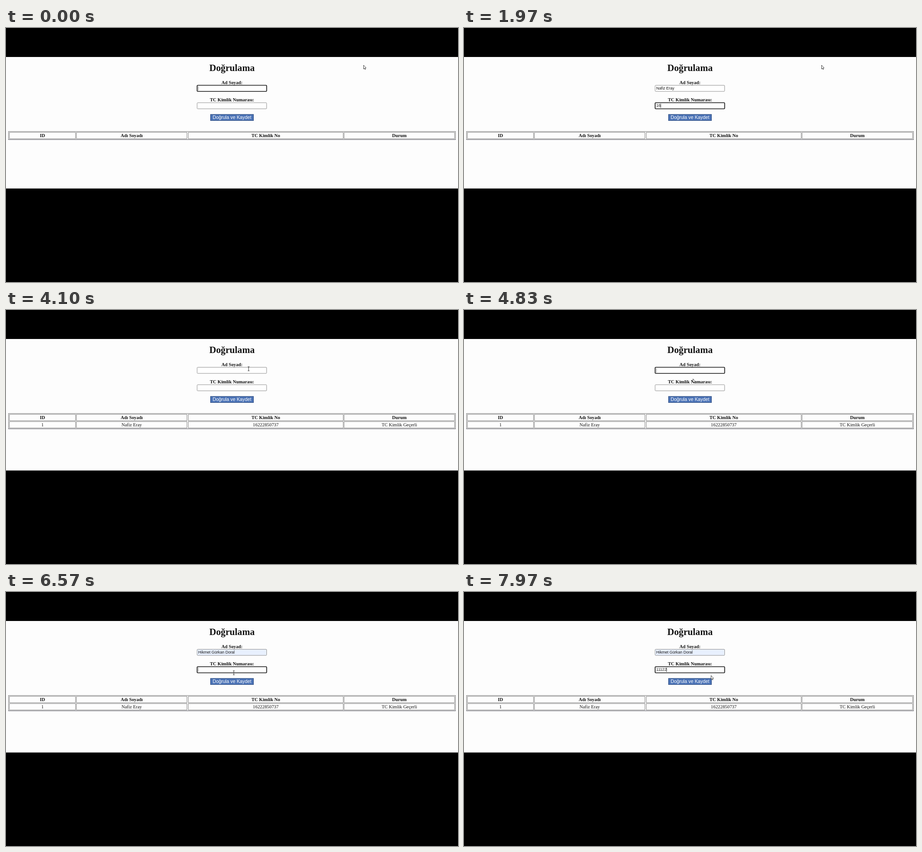
Animation of 998 by 561 pixels, one loop 8 s. Source, as an HTML page with a canvas:

```html
<!DOCTYPE html>
<html lang="tr">
<head>
<meta charset="utf-8">
<title>Doğrulama</title>
<style>
html, body { margin: 0; width: 100%; height: 100%; overflow: hidden; background: #000; }
canvas { display: block; }
</style>
</head>
<body>
<canvas id="stage" width="998" height="561"></canvas>
<script>
const ctx = document.getElementById('stage').getContext('2d');
const LOOP = 8000;
const SERIF = '"Liberation Serif", serif';
const SANS = '"Liberation Sans", sans-serif';
const FIELD = { x: 422, w: 154, h: 14 };
const NAME_Y = 126, ID_Y = 164.5;
const PERSON = { name: 'Nafiz Eray', id: '16222850737' };
const SECOND = { name: 'Hikmet Gürkan Doral', id: '11122' };

// Column edges of the table cells
const COLUMNS = [[7, 154], [155, 400], [402, 745], [746, 991]];
const HEAD = ['ID', 'Adı Soyadı', 'TC Kimlik No', 'Durum'];
const ROW = ['1', PERSON.name, PERSON.id, 'TC Kimlik Geçerli'];

const SUBMIT = 3000, CLICK_NAME = 4450, FILL = 5400, CLICK_ID = 6400;

// [time, value] and [time, x, y] keys
const NAME_KEYS = [[60, 0], [1450, 10]];
const ID_KEYS = [[1700, 0], [1930, 2], [2330, 8], [2630, 8], [2850, 11]];
const SECOND_KEYS = [[7360, 0], [7390, 1], [7900, 5]];
const POINTER = [
  [3500, 789.5, 82], [4270, 500, 136], [4550, 500, 136], [4800, 505.5, 152],
  [5170, 505.5, 152], [5600, 536, 163], [6030, 536, 163], [6380, 503, 178],
  [6830, 503, 178], [7070, 545.5, 184.5]
];

const linear = u => u;
const smooth = u => u * u * (3 - 2 * u);

function at(keys, t, ease = linear) {
  if (t <= keys[0][0]) return keys[0].slice(1);
  for (let i = 1; i < keys.length; i++) {
    const a = keys[i - 1], b = keys[i];
    if (t < b[0]) {
      const u = ease((t - a[0]) / (b[0] - a[0]));
      return a.slice(1).map((v, j) => v + (b[j + 1] - v) * u);
    }
  }
  return keys[keys.length - 1].slice(1);
}

const typed = (text, keys, t) => text.slice(0, Math.floor(at(keys, t)[0]));

function label(text, x, y, font, color = '#111', align = 'center') {
  ctx.font = font;
  ctx.fillStyle = color;
  ctx.textAlign = align;
  ctx.fillText(text, x, y);
}

function field(y, text, focused, caret, filled) {
  const { x, w, h } = FIELD;
  ctx.beginPath();
  ctx.roundRect(x, y + 0.5, w - 0.5, h - 0.5, 1.5);
  ctx.fillStyle = filled ? '#e8f0fe' : '#fff';
  ctx.fill();
  ctx.lineWidth = focused ? 1.7 : 0.9;
  ctx.strokeStyle = focused ? '#161616' : '#858585';
  ctx.stroke();
  label(text, 424.5, y + 9.7, '8.63px ' + SANS, '#161616', 'left');
  if (focused && caret) {
    ctx.fillStyle = text ? '#222' : '#777';
    ctx.fillRect(424.4 + ctx.measureText(text).width, y + 2.5, 0.9, 9.5);
  }
}

function cells(texts, y, font) {
  ctx.strokeStyle = '#858585';
  ctx.lineWidth = 1;
  COLUMNS.forEach(([l, r], i) => {
    ctx.strokeRect(l + 0.5, y + 0.5, r - l - 1, 14);
    label(texts[i], (l + r) / 2, y + 11.2, font);
  });
}

function table(hasRow) {
  const bottom = hasRow ? 262 : 246;
  ctx.lineWidth = 1;
  ctx.strokeStyle = '#808080';
  ctx.strokeRect(5.5, 228.5, 987, bottom - 228);
  ctx.fillStyle = '#55555f';
  ctx.fillRect(5, bottom, 988, 1);
  cells(HEAD, 230, 'bold 10.35px ' + SERIF);
  if (hasRow) cells(ROW, 246, '10.35px ' + SERIF);
}

function arrow(x, y) {
  ctx.beginPath();
  [[0, 0], [0, 8.6], [1.9, 6.9], [3.2, 9.7], [4.4, 9.1], [3.2, 6.4], [5.7, 6.2]]
    .forEach(([dx, dy]) => ctx.lineTo(x + dx, y + dy));
  ctx.closePath();
  ctx.fillStyle = '#fff';
  ctx.fill();
  ctx.lineWidth = 0.9;
  ctx.strokeStyle = '#333';
  ctx.stroke();
}

function beam(x, y) {
  ctx.fillStyle = '#333';
  ctx.fillRect(x - 0.5, y - 4, 1, 9);
  ctx.fillRect(x - 2, y - 4.5, 4, 0.9);
  ctx.fillRect(x - 2, y + 4.5, 4, 0.9);
}

function pointer(t) {
  const [x, y] = at(POINTER, t, smooth);
  const inside = x > FIELD.x && x < FIELD.x + FIELD.w &&
    [NAME_Y, ID_Y].some(top => y > top && y < top + FIELD.h);
  (inside ? beam : arrow)(x, y);
}

function formState(t) {
  if (t < SUBMIT) {
    return {
      name: typed(PERSON.name, NAME_KEYS, t),
      id: typed(PERSON.id, ID_KEYS, t),
      focus: t < 1600 ? 'name' : 'id',
      caret: true
    };
  }
  const filled = t >= FILL;
  const id = typed(SECOND.id, SECOND_KEYS, t);
  const focus = t < CLICK_NAME ? '' : t < CLICK_ID ? 'name' : 'id';
  const since = t - (focus === 'id' ? CLICK_ID : CLICK_NAME);
  return {
    name: filled ? SECOND.name : '',
    id, filled, focus,
    caret: id !== '' || (!(filled && focus === 'name') && since % 1000 < 500)
  };
}

function draw(t) {
  const s = formState(t);
  ctx.fillStyle = '#000';
  ctx.fillRect(0, 0, 998, 561);
  ctx.fillStyle = '#fdfdfd';
  ctx.fillRect(0, 64, 998, 290.5);

  label('Doğrulama', 499, 95.2, 'bold 20.7px ' + SERIF);
  label('Ad Soyad:', 499, 123.8, 'bold 10.35px ' + SERIF);
  label('TC Kimlik Numarası:', 499, 161.8, 'bold 10.35px ' + SERIF);
  field(NAME_Y, s.name, s.focus === 'name', s.caret, s.filled);
  field(ID_Y, s.id, s.focus === 'id', s.caret);

  ctx.fillStyle = '#4a72b6';
  ctx.fillRect(451, 190.5, 96, 14.5);
  ctx.lineWidth = 1;
  ctx.strokeStyle = '#34507f';
  ctx.strokeRect(451.5, 191, 95, 13.5);
  label('Doğrula ve Kaydet', 499, 201.2, '10.4px ' + SANS, '#fff');

  table(t >= SUBMIT);
  pointer(t);
}

function tick() {
  draw(performance.now() % LOOP);
  requestAnimationFrame(tick);
}
tick();
</script>
</body>
</html>
```
